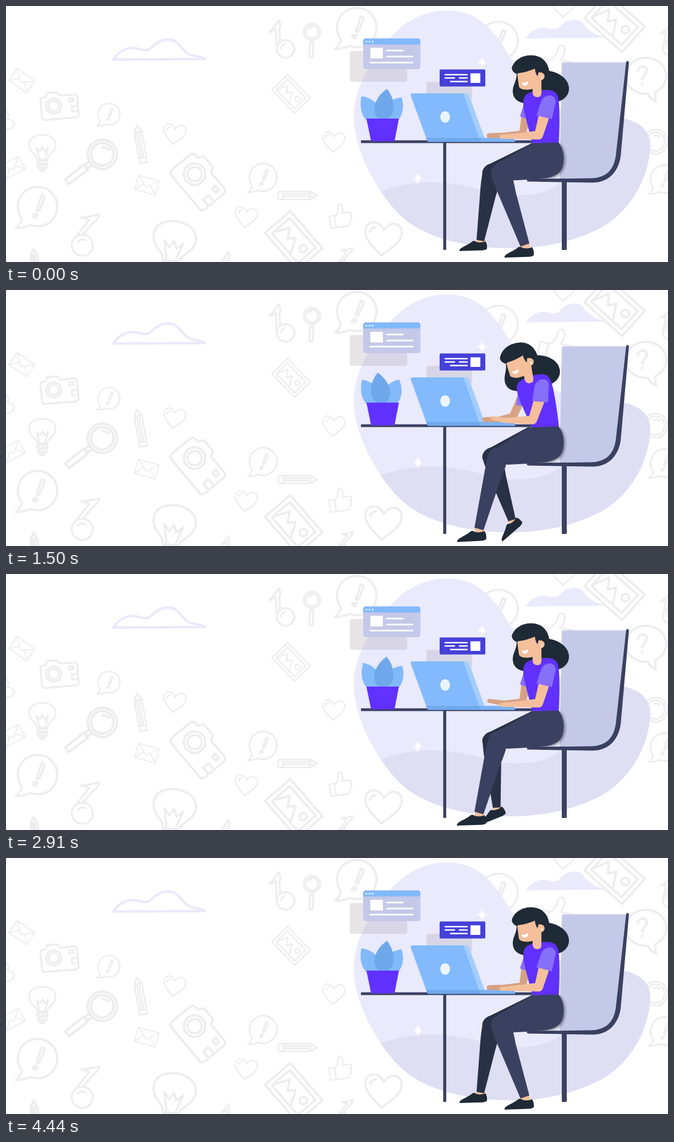
An HTML page that plays this animation: 1203x466 px, repeating every 4.51 s.

```html
<!DOCTYPE html>
<html lang="en">
<head>
<meta charset="utf-8">
<title>At the desk</title>
<style>
html, body { margin: 0; width: 100%; height: 100%; overflow: hidden; background: #fff; }
svg { display: block; width: 1203px; height: 466px; }
#doodles { fill: none; stroke: #eeeded; stroke-linejoin: round; stroke-linecap: round; }
#doodles path { vector-effect: non-scaling-stroke; }
.lines { stroke: #fff; stroke-width: 3; stroke-linecap: round; }
</style>
</head>
<body>
<svg viewBox="0 0 1203 466">
  <g id="doodles"></g>

  <!-- backdrop -->
  <clipPath id="clip"><path id="blob" d="M801 8C848 8 873 32 893 58C915 88 935 130 970 165C1005 198 1070 194 1115 203C1150 210 1171 225 1171 255C1168 310 1140 363 1095 395C1050 424 985 441 920 441C845 441 765 425 720 384C675 342 632 262 632 203C632 150 660 107 690 68C718 32 755 8 801 8Z"/></clipPath>
  <use href="#blob" fill="#e9eafb"/>
  <path clip-path="url(#clip)" fill="#dedff3" d="M660 346C730 312 805 318 865 335C915 350 970 349 1006 324C1048 285 1035 207 1120 203L1200 200V460H660Z"/>
  <path fill="none" stroke="#e9eafb" stroke-width="4.5" stroke-linejoin="round" d="M195 97.500C207 80 222 75 235 77C252 80 255 84 266 74C278 62 297 56 310 66C322 75 322 84 336 89C346 92 357 92 362 96.500Z"/>
  <path fill="#e9eafb" d="M944 59C954 44 967 38 981 40C993 42 1000 46 1008 36C1020 23 1041 21 1050 33C1058 44 1066 51 1092 57.500Z"/>

  <!-- cards -->
  <g fill="#b4aab9" fill-opacity=".32">
    <rect x="625" y="82" width="104" height="56" rx="4"/>
    <rect x="764" y="138" width="83" height="32" rx="2"/>
  </g>
  <rect x="649" y="59" width="104" height="56" rx="5" fill="#c4c8e9"/>
  <path fill="#82b9fc" d="M649 70V64Q649 59 654 59H748Q753 59 753 64V70Z"/>
  <path fill="#fff" d="M662 76H685V95.500H662Z"/>
  <path class="lines" d="M655 65h.1M660.500 65h.1M666 65h.1M692 81H721M692 92H739M662 103H739"/>
  <rect x="788" y="115.500" width="83" height="31" rx="2" fill="#4540d8"/>
  <path fill="#fff" d="M844 122.500H862V140H844Z"/>
  <path class="lines" style="stroke-width:2.500" d="M798 125H838M798 131H815M824 131H838M808 137.500H838"/>
  <path fill="#fff" d="M865 93Q867 101 874 103Q867 105 865 113Q863 105 856 103Q863 101 865 93M748.500 303Q750.500 312 757 314Q750.500 316 748.500 325Q746.500 316 740 314Q746.500 312 748.500 303"/>

  <!-- chair and desk -->
  <path fill="#c5c9e8" d="M1010 102.500H1130L1112 278Q1104 316 1065 317H1006Z"/>
  <path fill="#3a4060" d="M1127 102Q1129.500 98 1132 102L1117 274C1112 305 1092 321.500 1066 321.500L948 319.500Q945 317 948 315L1065 313.500Q1102 312 1108 274Z"/>
  <path fill="#3a4060" d="M1010 320H1019V444H1010ZM645 244.500H965V249.500H645ZM794.500 249H800V444H794.500Z"/>

  <!-- plant and laptop -->
  <g transform="translate(683.500 207)">
    <path id="leafL" fill="#82b9fb" d="M0 2C-30-2-29-36 0-57C17-36 15-8 0 2"/>
    <path id="leafR" fill="#82b9fb" d="M0 2C-15-8-17-36 0-54C29-36 30-2 0 2"/>
    <path id="leafM" fill="#6fa8ea" d="M0 2C-23-4-23-36 0-57C23-36 23-4 0 2"/>
  </g>
  <path fill="#6031ff" d="M655 205H714L706 246.500H663.500Z"/>
  <path fill="#a4cdfd" d="M828 159H836Q840 159 841.500 163L870 241H855Z"/>
  <path fill="#82bafd" d="M739 159H831L862 247H766L735.500 163Q735 159 739 159Z"/>
  <path fill="#6fa9ed" d="M763.500 240H862V247.500H768Q765 247 763.500 240Z"/>
  <path fill="#7cb3f6" d="M862 240H922Q926 243 925 247.500H862Z"/>
  <ellipse cx="798" cy="202" rx="8.800" ry="10.500" fill="#eef4fd"/>

  <!-- woman -->
  <path id="backArm" fill="#d6a283"/>
  <g id="torso">
    <path fill="#8570fa" d="M941 180L950 207L934 201Z"/>
    <path fill="#1f2a37" d="M919 113C924 96 942 88 959 90C976 92 985 104 987 118C1006 121 1024 134 1023 152C1022 168 1006 177 986 176L945 177C928 176 920 166 921 153C922 142 928 136 928 124Q920 120 919 113Z"/>
    <path fill="#6031ff" d="M957 156Q966 152 985 153C1000 154 1004 162 1005 178Q1007 210 1004 258H959L947 214C942 190 938 182 941 168Q944 159 957 156Z"/>
    <path fill="#f4bf9a" d="M929 123L951 116L962 113L969 121A7 6.500 0 1 1 973 135V158Q973 166 965.500 166Q958 166 957 158V151C945 154 933 152 932 146Z"/>
    <path fill="#1f2a37" d="M920 116Q923 124 931 122Q945 121 961 114Q962 123 966 128L968 120L978 116L960 98L930 105Z"/>
    <circle cx="973.500" cy="130" r="1.600" fill="#fff"/>
    <path fill="#fff" d="M937 140Q943 140 949 137Q949 144 943 145Q938 145 937 140Z"/>
  </g>
  <path id="backThigh" fill="#283146"/>
  <g id="backLeg"></g>
  <path fill="#3a405f" style="filter:drop-shadow(3px 2px 2px #0006)" d="M975 249H1004C1016 262 1016 290 1006 302C996 311 985 313 970 314Z"/>
  <path id="frontThigh" fill="#3a405f"/>
  <g id="frontLeg"></g>
  <path id="frontArm" fill="#f4bf9a"/>
  <path id="sleeve" fill="#8570fa" d="M971 178C976 158 999 159 999 174L992 206L964 199Z"/>
</svg>
<script>
const $ = id => document.getElementById(id);
const set = (id, k, v) => $(id).setAttribute(k, v);
const ring = (x, y, r) => `M${x - r} ${y}a${r} ${r} 0 1 0 ${2 * r} 0a${r} ${r} 0 1 0 ${-2 * r} 0`;

// hand-drawn icons, each about 80 units wide around its centre
const icon = {
  bubble: 'M-30 24Q-34 36-42 42Q-26 42-14 36A38.600 38.600 0 1 0-30 24ZM8-21Q16-22 13-14L4 7Q0 11-1 6ZM-5 14l5 2l-4 6l-5-3z',
  query: 'M10 32Q14 42 24 46Q22 38 24 28A37 33 0 1 0 10 32ZM-9-9Q-7-19 2-18Q11-14 6-6L0 2V6M-1 13v2',
  camera: 'M-30-18H-26L-22-26H-2L2-19H30Q36-19 36-13V20Q36 26 30 26H-30Q-36 26-36 20V-12Q-36-18-30-18ZM20-12h8v6h-8zM36 4H24V14H36' + ring(-11, 0, 15) + ring(-11, 0, 10),
  glass: ring(0, 0, 26) + ring(0, 0, 20) + 'M-10-8Q-6-14 0-14M-4 26V36H4V26M-6 38H6L5 80H-5Z',
  bulb: 'M-13 26C-14 14-36 6-36-14C-36-50 36-50 36-14C36 6 14 14 13 26ZM-14 30H14V37H-14ZM-12 41H12V48H-12ZM-8 52H8L4 58H-4ZM-8 22L-16-6L-6 4L0-8L6 4L16-6L8 22',
  pencil: 'M-40 0L-26-8H40V8H-26ZM-26-8V8M30-8V8M-24-2H28M-24 3H28',
  heart: 'M0 38C-18 22-40 6-40-14C-40-36-12-42 0-18C14-44 40-36 40-14C40 8 16 22 0 38ZM-29-12Q-27-22-18-23',
  note: 'M-8 12L-10-18L-22-12Q-14-20-4-34Q0-26-3-18L-2 5M-1 18Q1 11 6 9' + ring(8, 18, 16),
  picture: 'M-40-27H40V27H-40ZM-32-19H32V19H-32ZM-32 17L-20-9L-9 6L-1-5L13 19' + ring(20, -3, 6),
  thumb: 'M-38-2H-20V38H-38ZM-20 2Q-4-10-4-34Q6-42 10-28Q12-18 6-6H32Q40 0 32 8Q40 14 30 20Q36 26 26 30Q28 38 16 38H-20',
  letter: 'M-40-27H40V27H-40ZM-40-27L0 8L40-27M-40 27L-12-2M40 27L12-2'
};
// icon, x, y, turn, scale, line width
const doodles = [
  ['bubble', 57, 365, 0, .93, 4], ['bubble', 637, 39, 0, .93, 4], ['bubble', 187, 197, 0, .51, 2.5],
  ['bubble', 467, 312, 0, .65, 3], ['bubble', 1196, 315, 0, .65, 3], ['bubble', 895, 63, 0, .9, 4],
  ['query', 1157, 128, 0, 1, 4], ['camera', 352, 317, 50, 1.3, 4], ['camera', 97, 181, -5, .93, 3.5],
  ['glass', 175, 270, 52, 1.02, 4.5], ['glass', 556, 47, 2, .58, 3], ['glass', 1180, 247, 40, .85, 3],
  ['bulb', 66, 262, 0, .67, 3], ['bulb', 304, 436, 10, 1.08, 4], ['pencil', 244, 251, 80, .86, 3],
  ['pencil', 530, 345, 180, .88, 3], ['pencil', 53, 474, 84, .8, 4], ['heart', 306, 233, 8, .5, 2.5],
  ['heart', 436, 384, 8, .5, 2.5], ['heart', 685, 423, 5, .83, 4], ['heart', 595, 247, 5, .5, 2.5],
  ['heart', 1013, 1, 5, .5, 2.5], ['note', 500, 60, 0, 1, 3.5], ['note', 146, 413, 42, 1.2, 3.5],
  ['note', 616, 462, 42, .75, 3], ['note', 407, 472, 0, .7, 3], ['note', 1203, 63, 15, .75, 3],
  ['picture', 523, 427, 49, 1.12, 4], ['picture', 518, 160, 46, .74, 2.5], ['picture', 1106, 30, 42, 1.15, 4],
  ['thumb', 608, 381, -8, .55, 2.5], ['thumb', 1002, 102, 12, .85, 3], ['letter', 29, 136, 35, .49, 2],
  ['letter', 256, 326, 15, .49, 2], ['letter', 12, 294, -28, .48, 2], ['heart', -5, 210, 60, .45, 2.5]
];
$('doodles').innerHTML = doodles.map(([n, x, y, a, s, w]) =>
  `<path d="${icon[n]}" stroke-width="${w}" transform="translate(${x} ${y}) rotate(${a}) scale(${s})"/>`).join('');

const mix = (a, b, p) => a + (b - a) * p;
const mixPt = (a, b, p) => a.map((v, i) => mix(v, b[i], p));

// eased value through [time, value] pairs
function key(t, ...k) {
  if (t <= k[0][0]) return k[0][1];
  for (let i = 1; i < k.length; i++) if (t < k[i][0]) {
    const x = (t - k[i - 1][0]) / (k[i][0] - k[i - 1][0]);
    return mix(k[i - 1][1], k[i][1], x * x * (3 - 2 * x));
  }
  return k[k.length - 1][1];
}

// tapered limb through points [x, y, radius]
function limb(...pts) {
  let d = '';
  pts.forEach(([x, y, r], i) => {
    d += ring(x, y, r) + 'Z';
    if (!i) return;
    const [u, v, q] = pts[i - 1], l = Math.hypot(x - u, y - v), nx = (v - y) / l, ny = (x - u) / l;
    d += `M${u - nx * q} ${v - ny * q}L${u + nx * q} ${v + ny * q}L${x + nx * r} ${y + ny * r}L${x - nx * r} ${y - ny * r}Z`;
  });
  return d;
}

// lower leg from a knee to an ankle, with its shoe
function leg(id, [kx, ky], [ax, ay], r, w, color, shoe, turn) {
  const len = Math.hypot(ax - kx, ay - ky), a = -Math.atan2(ax - kx, ay - ky) * 180 / Math.PI;
  $(id).innerHTML = `<g transform="translate(${ax} ${ay}) rotate(${turn})">
    <path fill="#f4bf9a" d="M-7-4H8L9 8H-8Z"/>
    <path fill="#1f2a37" transform="${shoe}" d="M-37 23C-38 16-24 14-12 4Q-8 2-5 5Q4 8 13 4Q17 10 16 19Q13 21 8 21.500Z"/></g>
    <path fill="${color}" transform="translate(${kx} ${ky}) rotate(${a})" d="M${-r} 0A${r} ${r} 0 0 1 ${r} 0Q${r} 22 ${r - 3} 40L${w} ${len}H${-w}L${2 - r} 40Q${-r} 22 ${-r} 0Z"/>`;
}

function draw(t) {
  set('leafL', 'transform', `rotate(${key(t, [0, -41], [700, -29.5], [1000, -29.5], [1930, -47.5], [3700, -29.5], [4450, -41])})`);
  set('leafR', 'transform', `rotate(${key(t, [0, 41], [800, 45.2], [1930, 30], [3250, 45.2], [3700, 45.2], [4450, 41])})`);
  set('leafM', 'transform', `rotate(${key(t, [0, 9], [1930, -10.5], [3050, 9], [3600, 3], [4450, 9])})`);

  const lean = key(t, [330, 0], [870, 1], [2040, 1], [2580, 0]);
  const tilt = `rotate(${-9.5 * lean} 980 248)`;
  set('torso', 'transform', tilt);
  set('sleeve', 'transform', tilt);
  const th = 9.5 * lean * Math.PI / 180, c = Math.cos(th), s = Math.sin(th);
  const onTorso = (x, y, r) => [980 + (x - 980) * c + (y - 248) * s, 248 - (x - 980) * s + (y - 248) * c, r];

  // typing: each hand lifts from its wrist
  const tap = (from, to, peak, period) => t < from || t > to ? 0 : .5 + .5 * Math.cos((t - peak) / period * 2 * Math.PI);
  const backLift = tap(2670, 4350, 2910, 480), frontLift = tap(870, 2130, 1080, 420);
  set('backArm', 'd', limb(onTorso(946, 190, 8), mixPt([939, 233, 6.5], [921, 231, 7], lean),
    mixPt([906, 235.5, 5], [896, 235.5, 5], lean), [mix(878, 870, lean), 236 - 5 * backLift, 4.5 - backLift]));
  set('frontArm', 'd', limb(onTorso(979, 196, 10), mixPt([968, 235, 8], [957, 236.5, 8], lean),
    mixPt([917, 237.5, 4.5], [907, 237.5, 4.5], lean), [mix(900, 885, lean), 238 - 5 * frontLift, 3.5]));

  const waist = mix(957, 950, lean);
  set('backThigh', 'd', `M${waist} 249L882 286C868 292 864 299 866 308L900 312L970 290Z`);
  set('frontThigh', 'd', `M${waist} 250L1004 248.500C1016 262 1016 292 1006 302C996 313 975 315 950 316L911 318L882 306C881 296 887 289 900 282Z`);

  const swing = key(t, [94, 0], [944, 1], [2495, 1], [3345, 0]);
  leg('backLeg', [883, 304], [mix(862, 919.5, swing), 427 - 8 * swing + 10 * swing * (1 - swing)],
    17, 7, '#283146', 'translate(-3 -2.500) scale(.94)', -39 * swing);

  const cross = key(t, [0, 0], [660, 1], [3080, 1], [3740, 0]);
  const rock = cross === 1 && t > 1080 && t < 2700 ? Math.sin((t - 1080) / 270 * Math.PI) : 0;
  leg('frontLeg', [mix(899, 894, cross), 304], [mix(943, 859.5, cross), 435],
    18, 8.5, '#3a405f', `translate(${-3 * cross} 0)`, rock - 8 * Math.sin(Math.PI * cross));
}

function frame(now) {
  draw(Math.min(Math.floor(now % 4510 / 30) * 30, 4440));
  requestAnimationFrame(frame);
}
draw(0);
requestAnimationFrame(frame);
</script>
</body>
</html>
```
